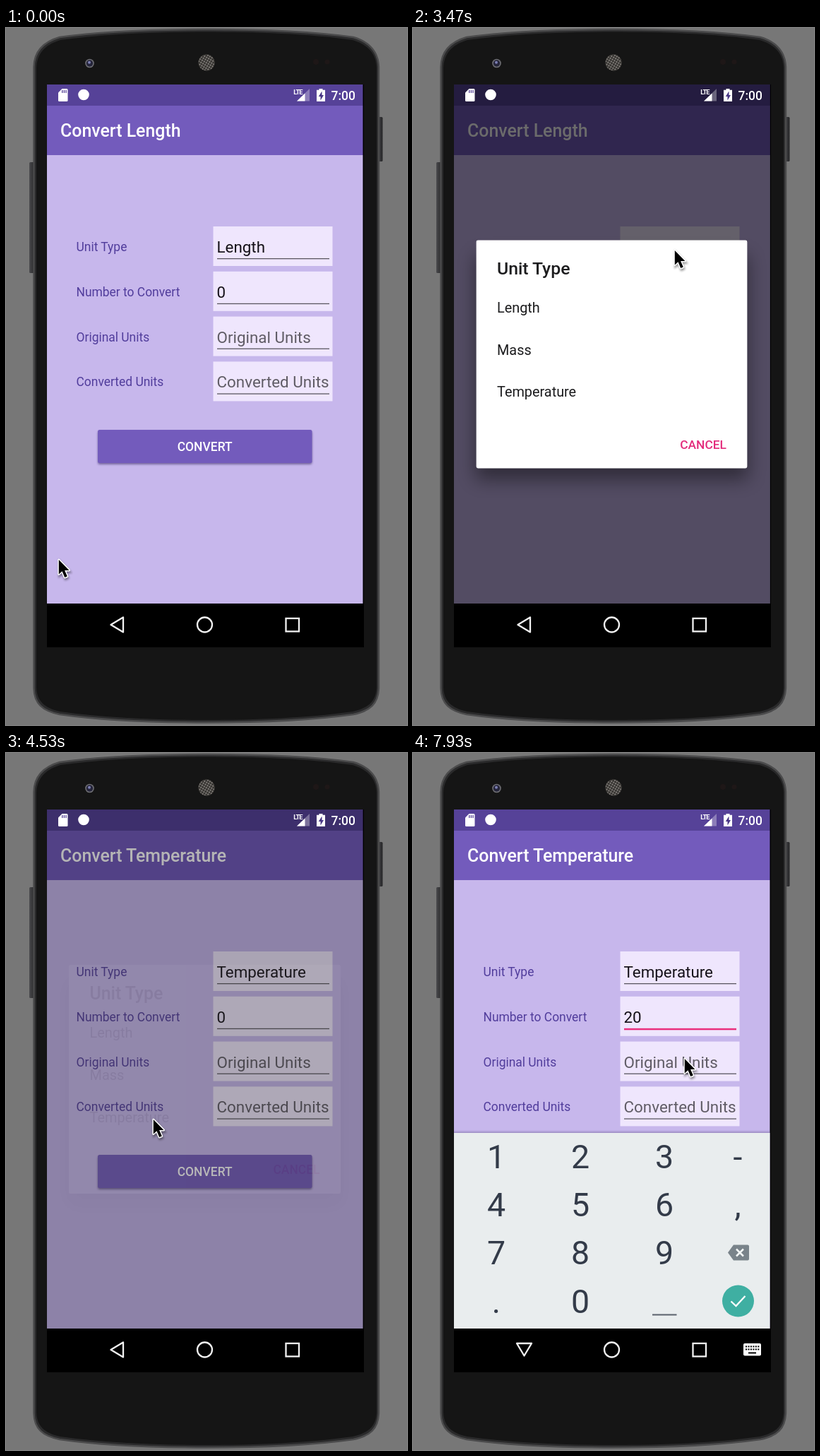
Recreate the animation shown at these times as an HTML page. Size 568 by 987 pixels, loop 8000 ms.

```html
<!DOCTYPE html>
<html lang="en">
<head>
<meta charset="utf-8">
<title>Unit converter</title>
<style>
  html, body { margin: 0; width: 100%; height: 100%; overflow: hidden; background: #777; }
  svg { display: block; width: 100%; height: 100%; }
  text { font-family: Roboto, sans-serif; white-space: pre; }
  .medium { font-weight: 500; }
  .mid { text-anchor: middle; }
  .label { font-size: 17.43px; fill: #513d9c; }
  .value { font-size: 22.4px; fill: #151118; }
  .hint { font-size: 22.4px; fill: #000; fill-opacity: .6; }
  .title { font-size: 24.9px; }
  .item { font-size: 19.92px; fill: #1c1c1e; }
  .key { font-size: 46.5px; fill: #333b49; }
  .nav { fill: none; stroke: #f2f2f2; stroke-width: 2.3; }
</style>
</head>
<body>
<svg viewBox="0 0 568 987" preserveAspectRatio="none">
  <defs>
    <clipPath id="screen"><rect x="58" y="80" width="447.5" height="735"/></clipPath>
    <pattern id="mesh" width="3.4" height="3.4" patternUnits="userSpaceOnUse" patternTransform="rotate(30 284 49)">
      <circle cx="1.7" cy="1.7" r="1.05" fill="#8b8783"/>
    </pattern>
    <linearGradient id="sideKey"><stop offset="0" stop-color="#4b4b4e"/><stop offset="1" stop-color="#242426"/></linearGradient>
    <filter id="soft" x="-30%" y="-60%" width="160%" height="240%"><feGaussianBlur stdDeviation="1.6"/></filter>
    <filter id="deep" x="-20%" y="-20%" width="140%" height="140%"><feGaussianBlur stdDeviation="13"/></filter>
  </defs>

  <rect width="568" height="987" fill="#777"/>

  <!-- phone body -->
  <rect x="33" y="190" width="8" height="157" rx="1.5" fill="url(#sideKey)"/>
  <rect x="526" y="126" width="7.5" height="63" rx="1.5" fill="url(#sideKey)"/>
  <path d="M39.500 55C40 34 52 20 76 13C140 4 215 2 284 2S428 4 492 13C516 20 527 34 528 55V935C527 957 516 967 492 972C428 981 353 983.500 284 983.500S140 981 76 972C52 967 40 957 39.500 935Z" fill="#2a2a2b" stroke="#4b4b4c" stroke-width="2.500"/>
  <path d="M43 56C44 37 54 24 77 17C140 8 215 5.500 284 5.500S428 8 491 17C514 24 524 37 525 56V934C524 953 514 963 491 968C428 977 353 980 284 980S140 977 77 968C54 963 44 953 43 934Z" fill="#151515"/>
  <circle cx="118.500" cy="50" r="6.300" fill="#6d6d72"/>
  <circle cx="118.500" cy="50" r="4.700" fill="#25253a"/>
  <circle cx="118" cy="48.800" r="2" fill="#7c7fb4"/>
  <circle cx="284" cy="49" r="11.700" fill="#373532"/>
  <circle cx="284" cy="49" r="11.200" fill="url(#mesh)"/>
  <g fill="#1e1717"><circle cx="439" cy="48" r="4"/><circle cx="455" cy="48" r="3.500"/></g>

  <rect x="58" y="80" width="449" height="797" fill="#000"/>
  <g clip-path="url(#screen)">
    <rect x="58" y="180" width="448" height="635" fill="#c7b7ec"/>
    <rect x="58" y="80" width="448" height="30" fill="#564298"/>
    <rect x="58" y="110" width="448" height="70" fill="#735bbc"/>
    <text id="title" class="title medium" x="77" y="154" fill="#fff"></text>
    <g id="form"></g>
    <rect x="130" y="571" width="303.500" height="47" rx="3" fill="#30205f" opacity=".55" filter="url(#soft)"/>
    <rect x="130" y="569" width="303.500" height="47" rx="2.500" fill="#735bbc"/>
    <text class="medium mid" x="281.700" y="599" font-size="17.430" fill="#fff">CONVERT</text>
    <rect id="caret" width="2.500" height="30" y="359" fill="#f02d78"/>
    <path id="handle" d="M311.500 387.500L320.300 395.700A12.500 12.500 0 1 1 302.700 395.700Z" fill="#ff2f78"/>

    <rect id="dim" x="58" y="80" width="448" height="735" fill="#000"/>
    <g id="dialog">
      <rect x="88" y="322" width="387" height="318" fill="#000" opacity=".42" filter="url(#deep)"/>
      <rect x="89" y="300" width="385" height="324" rx="2.500" fill="#fff"/>
      <text class="title medium" x="118.500" y="349" fill="#1c1c1e">Unit Type</text>
      <text class="item" x="118.500" y="403">Length</text>
      <text class="item" x="118.500" y="463">Mass</text>
      <text class="item" x="118.500" y="522.500">Temperature</text>
      <text class="medium" x="444.500" y="596" text-anchor="end" font-size="17.430" fill="#e32c7c">CANCEL</text>
    </g>

    <g id="pad">
      <rect x="50" y="536.500" width="464" height="300" fill="#30205f" opacity=".35" filter="url(#soft)"/>
      <rect x="58" y="538" width="448" height="320" fill="#e9edee"/>
      <g id="keys"></g>
      <path d="M339 795.500H373.500" stroke="#5a616c" stroke-width="2"/>
      <path d="M446 707.500L454 696.500H474Q476 696.500 476 698.500V716.500Q476 718.500 474 718.500H454Z" fill="#79838a"/>
      <path d="M458 702.500L468 712.500M468 702.500L458 712.500" stroke="#f1f4f4" stroke-width="2.500"/>
      <circle cx="460.500" cy="776" r="22.500" fill="#3fafa2"/>
      <path d="M450.500 776.500L457.500 783L470.500 769" fill="none" stroke="#fff" stroke-width="2.300"/>
    </g>
  </g>

  <!-- status bar -->
  <path d="M79.500 86H86Q87.500 86 87.500 87.500V102.500Q87.500 104 86 104H75.500Q74 104 74 102.500V91.500Z" fill="#fff"/>
  <path d="M79.700 88V92M82.400 88V92M85 88V92" stroke="#564298" stroke-width="1.300"/>
  <circle cx="110" cy="94.500" r="7.800" fill="#fff"/>
  <text x="407.300" y="94" font-size="9.300" font-weight="700" letter-spacing="-1" fill="#fff">LTE</text>
  <path d="M430 86V103.500H412Z" fill="#fff" opacity=".32"/>
  <path d="M423.500 92.500V103.500H412Z" fill="#fff"/>
  <path d="M443.500 86H448.500V87.800H452V104H440V87.800H443.500Z" fill="#fff"/>
  <path d="M447.500 89.500L442.800 97H445.500V102.500L450 95H447.500Z" fill="#483685"/>
  <text class="medium" x="460.500" y="101.500" font-size="17.430" fill="#fff">7:00</text>

  <!-- navigation bar -->
  <path id="back" class="nav" stroke-linejoin="round"/>
  <circle class="nav" cx="281.500" cy="845" r="10.500"/>
  <rect class="nav" x="396.500" y="836" width="18.500" height="18.500"/>
  <g id="switcher">
    <rect x="468" y="836" width="25" height="17.500" rx="2" fill="#fff"/>
    <path d="M471 840.500H490.500M471 844.500H490.500" stroke="#000" stroke-width="2" stroke-dasharray="2.100 1.350"/>
    <path d="M475 849.500H486" stroke="#000" stroke-width="2"/>
  </g>

  <g id="pointer">
    <path d="M0 0V20.500L4.700 16.300L8.400 25L12 23.500L8.300 14.900H14.600Z" transform="translate(1 2.500)" fill="#000" stroke="#000" stroke-width="3" opacity=".4" filter="url(#soft)"/>
    <path d="M0 0V20.500L4.700 16.300L8.400 25L12 23.500L8.300 14.900H14.600Z" fill="#000" stroke="#fff" stroke-width="3" stroke-linejoin="round" paint-order="stroke"/>
  </g>
</svg>
<script>
const LOOP = 8000;
const $ = id => document.getElementById(id);
const clamp = v => Math.max(0, Math.min(1, v));
const ramp = (t, a, b) => clamp((t - a) / (b - a));
const easeOut = p => 1 - (1 - p) ** 2;
const within = (t, a, b) => t >= a && t < b;
const show = (el, on) => el.setAttribute('display', on ? 'inline' : 'none');
const set = (el, attrs) => { for (const k in attrs) el.setAttribute(k, attrs[k]); };

const rows = ['Unit Type', 'Number to Convert', 'Original Units', 'Converted Units'];
$('form').innerHTML = rows.map((name, i) => {
  const y = 281 + i * 63.8;
  return `<text class="label" x="99.500" y="${y + 35}">${name}</text>
    <rect x="293.500" y="${y}" width="169" height="56" fill="#efe6fd"/>
    <text id="value${i}" class="${i < 2 ? 'value' : 'hint'}" x="298.500" y="${y + 37}">${name}</text>
    <rect id="line${i}" x="299" y="${y + 45}" width="159"/>`;
}).join('');

$('keys').innerHTML = ['123-', '456,', '789', '.0'].map((row, r) =>
  [...row].map((c, i) =>
    `<text class="key mid" x="${[118, 237, 356, 460][i]}" y="${588 + r * 68.2}">${c}</text>`).join('')).join('');

// pointer stops: time, x, y
const stops = [
  [70, 74, 752], [190, 44, 742], [320, 15, 690], [470, 100, 572], [670, 300, 445], [870, 387, 396],
  [930, 387, 396], [1330, 415, 345], [1670, 441, 308],
  [2540, 441, 308], [2600, 405, 305], [2930, 370, 314],
  [3680, 370, 314], [3850, 300, 405], [4070, 208, 518],
  [4580, 208, 518], [4830, 310, 480], [5070, 401, 411], [5130, 364, 365],
  [7740, 364, 365], [7800, 369, 385], [7870, 379, 418], [7930, 384, 432]
];

function pointerAt(t) {
  const n = stops.findIndex(s => s[0] > t);
  if (n === 0) return stops[0].slice(1);
  if (n < 0) return stops.at(-1).slice(1);
  const a = stops[n - 1], b = stops[n], p = ramp(t, a[0], b[0]);
  return [1, 2].map(k => a[k] + (b[k] - a[k]) * p);
}

function underline(i, active) {
  set($('line' + i), active
    ? { height: 2.5, fill: '#ea2f7c', 'fill-opacity': 1 }
    : { height: 1.3, fill: '#000', 'fill-opacity': .62 });
}

function draw(t) {
  const unit = t < 4270 ? 'Length' : 'Temperature';
  $('title').textContent = 'Convert ' + unit;
  $('value0').textContent = unit;

  const empty = within(t, 6000, 7200);
  $('value1').textContent = t < 6000 ? '0' : empty ? 'Enter Number' : t < 7330 ? '2' : '20';
  $('value1').setAttribute('class', empty ? 'hint' : 'value');

  underline(0, within(t, 3130, 3330));
  underline(1, t >= 5270);
  underline(2, false);
  underline(3, false);

  show($('caret'), within(t, 5270, 5770) || within(t, 6000, 6470) || within(t, 6930, 7800));
  $('caret').setAttribute('x', t < 6000 ? 311 : empty ? 299 : t < 7330 ? 311.5 : 324);
  show($('handle'), within(t, 5330, 6000));

  const enter = easeOut(ramp(t, 3250, 3520));
  const leave = ramp(t, 4250, 4545);
  $('dim').setAttribute('opacity', .6 * enter * (1 - ramp(t, 4270, 4775)));
  const scale = .9 + .1 * enter;
  set($('dialog'), {
    opacity: ramp(t, 3250, 3430) * (1 - leave),
    transform: `translate(281.500 462) scale(${scale}) translate(-281.500 -462)`
  });

  const rise = easeOut(ramp(t, 5380, 5680));
  set($('pad'), { opacity: rise, transform: `translate(0 ${(1 - rise) * 60})` });
  $('switcher').setAttribute('opacity', rise);
  $('back').setAttribute('d', t < 5400
    ? 'M148.500 845L166 834.500V855.500Z'
    : 'M147 836H168L157.500 853.500Z');

  const [x, y] = pointerAt(t);
  $('pointer').setAttribute('transform', `translate(${x + .8} ${y + 1})`);
}

const start = performance.now();
function tick(now) {
  draw(Math.max(0, now - start) % LOOP);
  requestAnimationFrame(tick);
}
draw(0);
requestAnimationFrame(tick);
</script>
</body>
</html>
```
